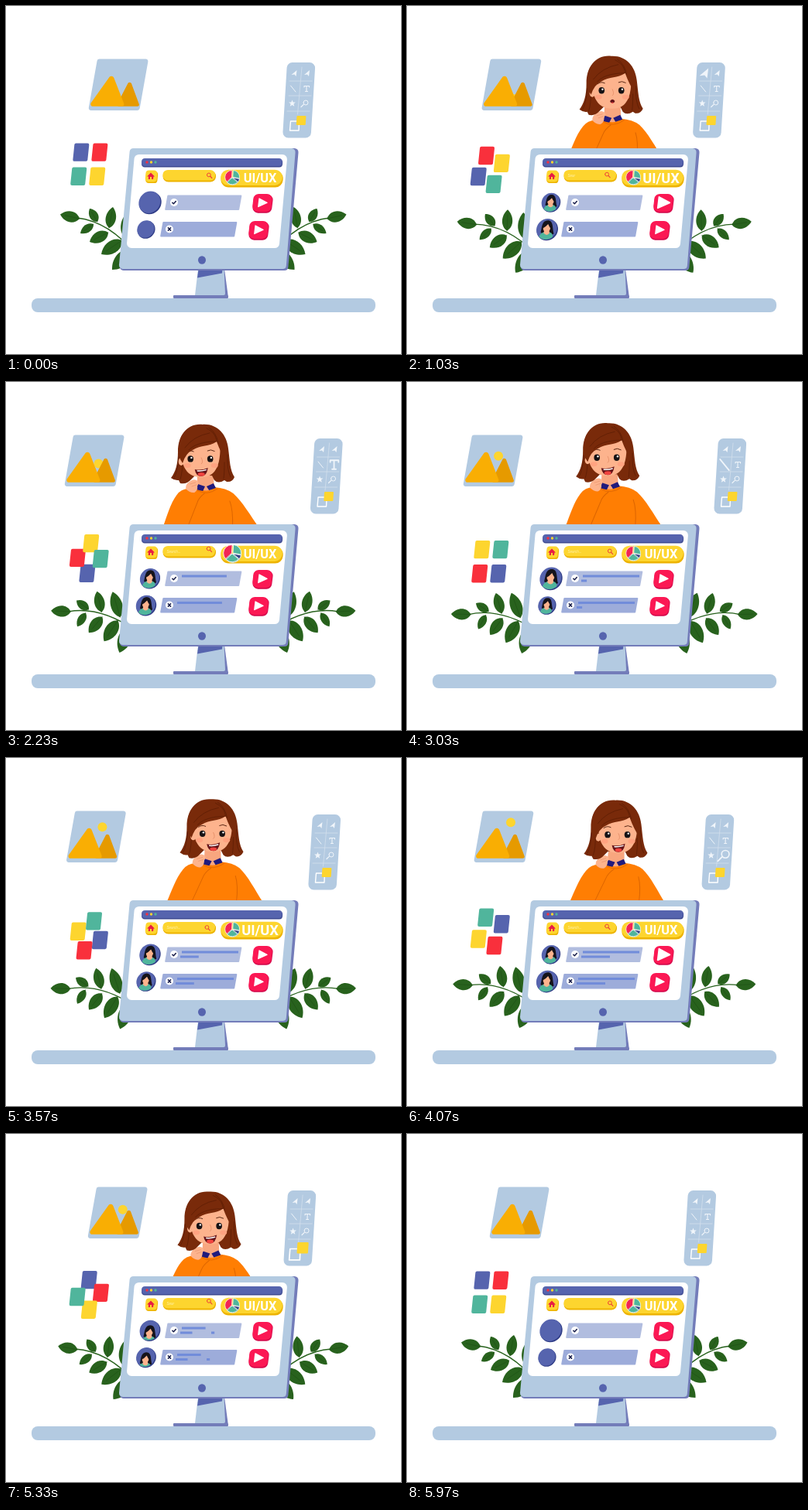
Recreate the animation shown at these times as an HTML page with a canvas. Size 510 px wide and 450 px high, loop 6010 ms.

```html
<!DOCTYPE html>
<html>
<head>
<meta charset="utf-8">
<style>
html, body { margin: 0; width: 100%; height: 100%; overflow: hidden; background: #fff; }
canvas { display: block; }
</style>
</head>
<body>
<canvas id="stage" width="510" height="450"></canvas>
<script>
const ctx = document.getElementById('stage').getContext('2d');
const LOOP = 6010, TAU = Math.PI * 2;
const BLUE = '#b3cae1', NAVY = '#5664ae', YELLOW = '#fdd52f', GOLD = '#edb300', RED = '#f9303c',
  TEAL = '#50b59c', SKIN = '#fdb38d', HAIR = '#792a0a', DARK_HAIR = '#5d1d05', GREEN = '#28621d',
  PINK = '#fb1854', ICON = '#f0f5fa';

const clamp = v => Math.max(0, Math.min(1, v));
const part = (t, a, b) => clamp((t - a) / (b - a));
const wave = p => (1 - Math.cos(Math.PI * p)) / 2;
const ease = (t, a, b) => wave(part(t, a, b));
const bump = (t, mid, width) => Math.sin(Math.PI * part(t, mid - width / 2, mid + width / 2)) ** 2;

function fill(d, color) { ctx.fillStyle = color; ctx.fill(new Path2D(d)); }
function line(d, color, width = 1) {
  ctx.strokeStyle = color;
  ctx.lineWidth = width;
  ctx.lineCap = ctx.lineJoin = 'round';
  ctx.stroke(new Path2D(d));
}
function oval(x, y, rx, ry, color) {
  ctx.beginPath();
  ctx.ellipse(x, y, rx, ry, 0, 0, TAU);
  ctx.fillStyle = color;
  ctx.fill();
}
function poly(pts, r, color) {
  const n = pts.length, [a, b] = [pts[n - 1], pts[0]];
  ctx.beginPath();
  ctx.moveTo((a[0] + b[0]) / 2, (a[1] + b[1]) / 2);
  pts.forEach((p, i) => ctx.arcTo(...p, ...pts[(i + 1) % n], r));
  ctx.closePath();
  ctx.fillStyle = color;
  ctx.fill();
}
// Slanted box: the lower edge is shifted left by k.
function para(x, y, w, h, k, r, color) {
  poly([[x, y], [x + w, y], [x + w - k, y + h], [x - k, y + h]], r, color);
}
function at(x, y, scale, draw, angle = 0) {
  ctx.save();
  ctx.translate(x, y);
  ctx.rotate(angle);
  ctx.scale(scale, scale);
  draw();
  ctx.restore();
}

// base x, base y, tip x, tip y, width; the first one ends the stem
const LEAVES = [
  [95, 275, 70, 269.5, 14], [118, 279, 108, 262, 11], [133, 287, 138, 260, 13], [154, 300, 158, 266, 15],
  [113, 282, 96, 294, 10], [132, 293, 108, 305, 14], [150, 303, 123, 321, 16], [162, 315, 137, 341, 17]
];
function plant(t) {
  const turn = 19 * Math.PI / 180 * Math.sin(Math.PI * Math.min(t / 6000, 1)) ** 1.7;
  ctx.save();
  ctx.translate(165, 325);
  ctx.rotate(-turn);
  ctx.translate(-165, -325);
  line('M168 322Q134 279 92 274', GREEN, 1.3);
  LEAVES.forEach(([x, y, tx, ty, w], i) => {
    const len = Math.hypot(tx - x, ty - y), droop = i ? turn * .4 : -turn * .4;
    at(x, y, 1, () => {
      fill(`M0 0C${len * .2} ${-w * .68} ${len * .7} ${-w * .68} ${len} 0C${len * .7} ${w * .68} ${len * .2} ${w * .68} 0 0Z`, GREEN);
      line(`M0 0H${len * .75}`, '#1d4d14', .5);
    }, Math.atan2(ty - y, tx - x) - droop);
  });
  ctx.restore();
}

function picture(t, slide) {
  ctx.save();
  ctx.translate(-34.5 * slide, 0);
  para(118, 68.5, 66, 66.5, 11.8, 3, BLUE);
  ctx.save();
  ctx.beginPath();
  ctx.rect(100, 66, 90, 63.8);
  ctx.clip();
  const up = t * (1 - ease(t, 4950, 5750));
  if (up > 400) oval(146 + .002 * up, 132.5 - .0121 * up, 6, 6, YELLOW);
  poly([[142, 130], [160, 95], [173, 130]], 2.5, '#e69a00');
  poly([[106, 130.5], [137, 87], [154, 130.5]], 3.5, '#f9ae03');
  ctx.restore();
  ctx.restore();
}

const swatchColors = [NAVY, RED, YELLOW, TEAL];
function swatches(t) {
  const step = Math.min(t, 6000) / 1500, p = step % 1;
  const angle = (Math.floor(step) + wave(p)) * Math.PI / 2;
  const r = 1 - .12 * Math.sin(Math.PI * wave(p));
  const cy = 204.7 + 27.5 * wave(Math.min(t, 6000) / 3000);
  swatchColors.forEach((color, i) => {
    const a = -Math.PI * .75 + i * Math.PI / 2 - angle;
    const x = 17 * r * Math.cos(a), y = 22 * r * Math.sin(a);
    para(107.3 + x - y * .1 - 8.3, cy + y - 11.7, 19, 23.4, 2.4, 2, color);
  });
}

const arrow = () => fill('M3 -4L2 4L0 1.5L-4 2Z', ICON);
function star() {
  let d = '';
  for (let i = 0; i < 10; i++) {
    const a = i * Math.PI / 5, r = i % 2 ? 2 : 4.6;
    d += `${i ? 'L' : 'M'}${r * Math.sin(a)} ${-r * Math.cos(a)}`;
  }
  fill(d + 'Z', ICON);
}
// x, y, time of the pulse, its strength, drawing
const ICONS = [
  [372.5, 87, 1000, .65, arrow],
  [389, 87, 1620, .65, arrow],
  [388, 107, 2250, .65, () => line('M-3 -2V-3.5H3.5V-2M0 -3.5V3.5M-1.5 3.5H1.5', ICON, 1.1)],
  [370.5, 107, 3000, .8, () => line('M-3 -4L3.5 4', ICON, 1)],
  [385.5, 126, 4020, .65, () => {
    line('M-1.3 1.3L-4.5 4.5', ICON, 1.2);
    line('M-1.5 -1A3 3 0 1 0 4.5 -1A3 3 0 1 0 -1.5 -1', ICON, 1);
  }],
  [369.5, 126, 4640, .65, star],
  [376.5, 151.5, 5300, .2, () => {
    line('M-9 -2.5H2L1.5 9.5H-10Z', '#fff', 1.4);
    para(-1, -9.5, 12, 12, .8, 1, YELLOW);
  }]
];
function tools(t, slide) {
  ctx.save();
  ctx.translate(39.6 * slide, 0);
  para(363, 73, 36.5, 97.5, 6, 7, BLUE);
  line('M382 79L376.5 140M366 97H395M365 116H394M363 136H392', '#d2dfec', .8);
  for (const [x, y, mid, grow, draw] of ICONS) at(x, y, 1 + grow * bump(t, mid, 850), draw);
  ctx.restore();
}

function body(x) {
  ctx.save();
  ctx.translate(264, 260);
  ctx.transform(1, 0, -x / 126, 1, 0, 0);
  ctx.translate(-264, -260);
  fill('M206 186C212 172 217 155 226 144Q232 136 242 136L254 134H275Q290 135 299 142C310 152 320 171 330 186L348 240H185Z', '#ff7e03');
  line('M262 142Q254 148 252 154L238 186M294 152Q298 164 296 186', '#dc6500', 1);
  fill('M254 110H274L275 134Q264 143 253 134Z', '#f8a67f');
  fill('M254 130L263 133L260 139Q255 138 252 137ZM265 133L274 129L277 135L268 138Z', '#201b7d');
  line('M252 138Q265 146 279 136', '#dc6500', .8);
  fill('M238 136Q238 130 243 127Q249 122 254 126Q256 129 253 132Q254 138 249 141Q243 142 238 136Z', SKIN);
  line('M244 130L251 128M246 133L252 131', '#e8936d', .7);
  ctx.restore();
}

function head(x, smile) {
  fill('M0 53C-20 51 -32 67 -32 88C-32 104 -35 114 -41 122Q-36 126 -31 125L-29 129Q-21 131 -15 124L-10 119H12L15 125Q20 130 28 125L31 127Q38 128 41 121C35 112 35 100 33 84C31 66 19 52 0 53Z', HAIR);
  line('M-31 95Q-32 114 -37 122M32 92Q31 112 36 121M-26 98Q-26 115 -29 124M28 102Q28 116 27 123', DARK_HAIR, .8);
  ctx.save();
  ctx.translate(x * .35, 0);
  oval(-25, 101, 3.5, 5, SKIN);
  fill('M-25 72C-27 103 -21 121 1 121C21 121 27 103 25 72Z', SKIN);
  oval(-17, 106, 4.5, 3, '#ffa381');
  oval(18, 106, 4.5, 3, '#ffa381');
  for (const ex of [-13, 12.5]) {
    oval(ex, 97.5, 3.8, 4.2, '#171214');
    oval(ex + 1.2, 96, 1.2, 1.2, '#fff');
  }
  line('M-18 89Q-14 85.5 -9 88M9 87Q13 84.5 18 87.5', '#5a2815', 1);
  line('M1 96Q4 102 1 104', '#e8936d', 1);
  const w = 3 + 5.5 * smile, h = 2.5 + 6.5 * smile;
  fill(`M${1 - w} 111Q1 ${107 + 6 * smile} ${1 + w} ${111 - 2 * smile}Q${2 + w * .7} ${111 + h} 1 ${111 + h}Q${-w * .7} ${111 + h} ${1 - w} 111Z`, '#651419');
  oval(1, 112 + h * .6, w * .52, h * .26, '#f0433f');
  if (smile > .5) line('M-4 113Q2 113.5 7 111.7', '#fff', 1.5);
  ctx.restore();
  fill('M-29 98C-37 68 -19 52 1 54C24 54 34 74 30 99C26 94 22 86 18 75C8 82 -2 79 -13 86Q-22 90 -26 103Z', HAIR);
  line('M18 75C17 67 13 62 5 58M17 75C10 75 -9 76 -18 86M9 64Q-12 68 -23 83M20 77Q18 64 8 57', DARK_HAIR, .8);
}

function girl(t) {
  const shown = ease(t, 300, 1200) * (1 - ease(t, 5150, 5850));
  if (!shown) return;
  const sway = 8 * Math.sin(TAU * (t - 3270) / 4200);
  ctx.save();
  ctx.beginPath();
  ctx.rect(150, 0, 220, 200);
  ctx.clip();
  ctx.translate(0, 138 * (1 - shown) + .03 * sway * sway);
  body(sway * .75);
  at(262 + sway, 0, 1, () => head(sway, ease(t, 1100, 1500)));
  ctx.restore();
}

function avatar(x, y, r, shown) {
  ctx.save();
  ctx.translate(x, y);
  ctx.scale(r / 14.5, r / 14.5);
  ctx.transform(1, 0, -.1, 1, 0, 0);
  oval(.8, .7, 14.3, 14.5, '#2f3c86');
  oval(-.3, -.3, 13.9, 14.2, NAVY);
  if (shown) {
    ctx.clip();
    ctx.translate(0, 28 * (1 - shown));
    fill('M-8 4C-7 -2 -8 -12 0 -12C8 -12 7 -2 10 6Q6 9 1 8Q-5 8 -8 4Z', '#15131b');
    fill('M-10 16Q-11 6 -4 4H4Q10 5 9 16Z', TEAL);
    fill('M-3 0H3L4 5Q1 10 -4 5Z', SKIN);
    oval(-.3, -2.2, 5, 6, SKIN);
    fill('M-6 -1Q-6 -10 1 -10Q7 -9 6 0Q3 -3 1 -7Q-2 -3 -6 -1Z', '#15131b');
  }
  ctx.restore();
}

function row(t, dx, dy, color, mark) {
  ctx.save();
  ctx.translate(dx, dy);
  para(208.5, 244.5, 96, 19.5, 3.5, 1, color);
  const keep = 1 - ease(t, 5000, 5600);
  const dash = (x, y, len, a, b) => {
    ctx.fillStyle = '#718cda';
    ctx.fillRect(x, y, len * part(t, a, b) * keep, 3);
  };
  dash(227, 249.5, 73, 1200, 2500);
  dash(225, 255.5, 37, 2800, 4000);
  dash(265, 255.5, 10, 4100, 4600);
  oval(217, 254, 5, 5, '#fff');
  line(mark, '#161b49', 1.5);
  ctx.restore();
}

function play(x, y, scale) {
  para(x - 10.5, y - 11.3, 25, 24, 3, 7, '#d50a4c');
  para(x - 11, y - 12, 24.5, 23, 2.5, 7, PINK);
  at(x, y - .5, scale, () => poly([[-4.5, -6.5], [7.5, 0], [-6, 6]], .7, '#fff'));
}

function slice(color, from, to, dx, dy) {
  ctx.beginPath();
  ctx.moveTo(dx, dy);
  ctx.arc(dx, dy, 8.8, from * TAU, to * TAU);
  ctx.closePath();
  ctx.fillStyle = color;
  ctx.fill();
  ctx.strokeStyle = '#fff';
  ctx.lineWidth = .7;
  ctx.stroke();
}
function pie() {
  slice('#226b70', 0, .5, .6, .8);
  slice(TEAL, -.24, .03, .8, -.4);
  slice(TEAL, .11, .38, 0, .3);
  slice('#344386', .03, .11, .8, .2);
  slice('#f32554', .38, .76, -.5, -.3);
}

function screen(t) {
  para(175.5, 198, 182, 10.5, .8, 4, '#3d4990');
  para(175.5, 197, 181.5, 10, .8, 4, NAVY);
  [RED, YELLOW, TEAL].forEach((color, i) => oval(182 + i * 5.5, 202, 1.7, 1.8, color));

  para(181.3, 213.7, 15.3, 15.3, 1.5, 4, GOLD);
  para(180.8, 212.6, 15, 14.8, 1.5, 4, YELLOW);
  fill('M187 215.5L192 220.5H190.5L190 224H188V221H186V224H183.8L184 220.5H182Z', '#e91d42');

  para(203.5, 213, 68.5, 14.5, 1.8, 7, GOLD);
  para(203.2, 212, 67.8, 13.5, 1.8, 6.5, YELLOW);
  const letters = Math.floor(9 * part(t, 500, 1600) * (1 - part(t, 5100, 5600)));
  ctx.fillStyle = '#fff3b2';
  ctx.font = 'italic 4.5px "Liberation Sans", sans-serif';
  ctx.textAlign = 'left';
  ctx.fillText('Search...'.slice(0, letters), 207.5, 221);
  const orbit = TAU * t / 3000 + .72;
  at(260.4 + 2.2 * Math.cos(orbit), 217.4 + 2 * Math.sin(orbit), 1, () => {
    line('M1.7 1.5L3.8 3.8', '#ee4639', 1.2);
    line('M-2.6 -.3A2.4 2.4 0 1 0 2.2 -.3A2.4 2.4 0 1 0 -2.6 -.3', '#ee4639', 1);
  });

  para(278.6, 213, 80.2, 21.5, 2.2, 10, GOLD);
  para(278.2, 211.7, 79.8, 20.2, 2.2, 10, YELLOW);
  at(292, 221.7, 1 + .22 * (bump(t, 2200, 1100) + bump(t, 4720, 1000)), pie);
  at(328, 222.2, 1 + .12 * (bump(t, 1000, 850) + bump(t, 3550, 850)), () => {
    ctx.fillStyle = '#fff';
    ctx.font = 'bold 16.3px Roboto, "Liberation Sans", sans-serif';
    ctx.textAlign = 'center';
    ctx.fillText('UI/UX', 0, 5.9);
  });

  const beat = 1.5 * Math.cos(TAU * t / 3000);
  const shown = ease(t, 450, 900) * (1 - ease(t, 5200, 5700));
  avatar(185.6, 254, 13 + beat, shown);
  avatar(180.6, 288.8, 13 - beat, shown);
  row(t, 0, 0, '#b1bddf', 'M214.8 254.2L216.4 255.7L219.3 252.6');
  row(t, -6, 34.5, '#9dacda', 'M215.4 252.4L218.6 255.6M218.6 252.4L215.4 255.6');
  const phase = t % 3000;
  play(331, 255, 1 + .4 * bump(phase, 1080, 800));
  play(326, 290, 1 + .4 * bump(phase, 2620, 700));
}

function monitor(t) {
  fill('M248 340H282L287 377H281Z', '#737cb9');
  fill('M248 340H281.5L283 372Q283 374 281 374H244Z', BLUE);
  fill('M248.5 341H279.5L279 345.5L247 351.5Z', NAVY);
  poly([[216, 374], [286.5, 374], [287, 378], [216, 378]], 1, '#737cb9');
  poly([[166, 184], [378, 184], [364, 342], [146, 342]], 5, '#737cb9');
  poly([[160, 184], [374, 184], [361.5, 340], [145.5, 340]], 5, BLUE);
  poly([[166, 192], [363.5, 192], [352.5, 313], [155.5, 313]], 6, '#fff');
  oval(253, 328.5, 5, 5.2, NAVY);
  screen(t);
}

function draw(now) {
  const t = now % LOOP;
  const slide = wave(Math.min(t, 5630) / 2815);
  ctx.clearRect(0, 0, 510, 450);
  plant(t);
  ctx.save();
  ctx.translate(509.5, 0);
  ctx.scale(-1, 1);
  plant(t);
  ctx.restore();
  picture(t, slide);
  swatches(t);
  tools(t, slide);
  girl(t);
  para(33, 378, 444, 18, 0, 8, BLUE);
  monitor(t);
}

const start = performance.now();
function tick() {
  draw(performance.now() - start);
  requestAnimationFrame(tick);
}
tick();
</script>
</body>
</html>
```
